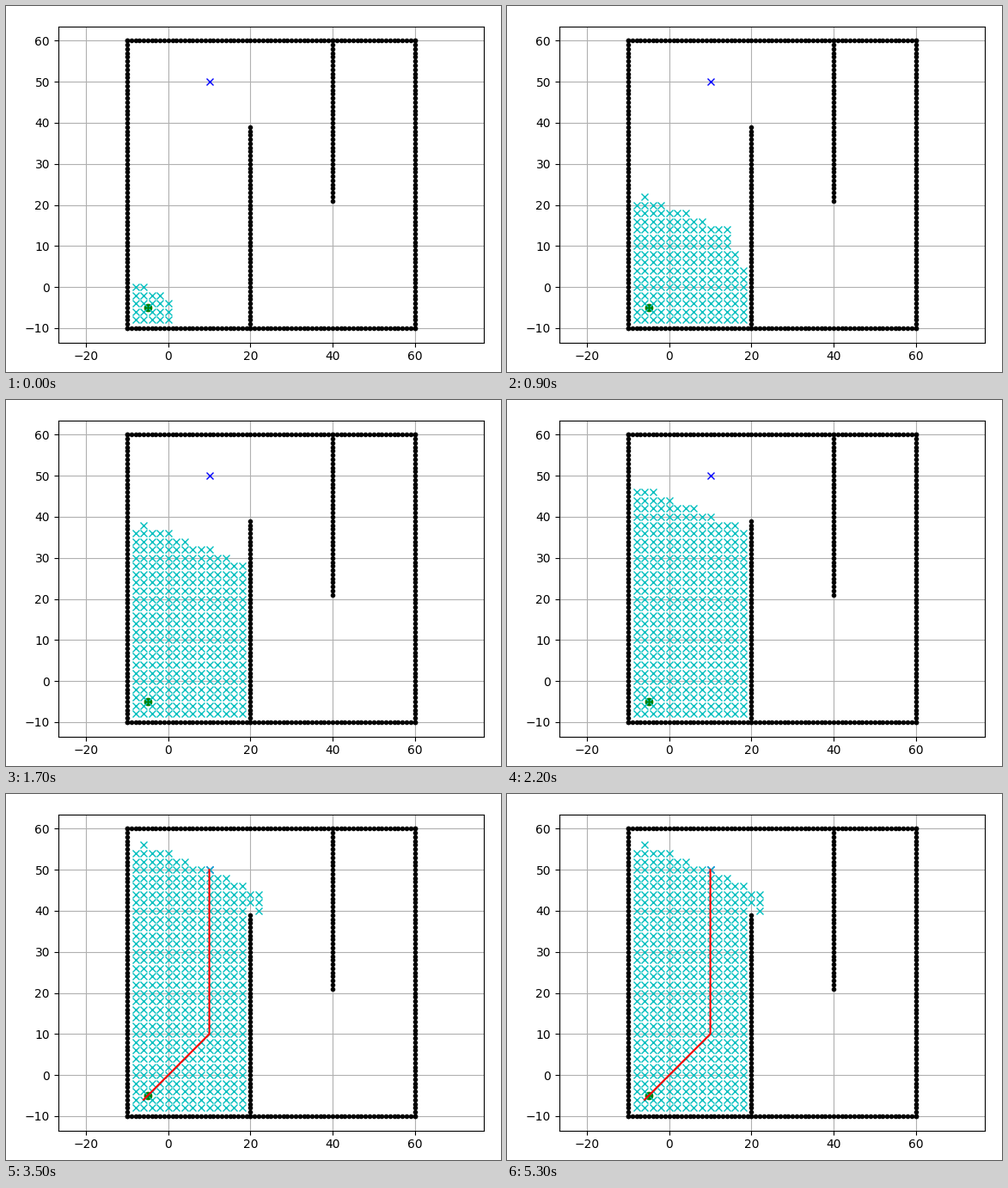
Write a matplotlib script that moves like this. It is 576 px wide and 426 px high and loops after 5400 ms.

```python
import math

import matplotlib.pyplot as plt
import numpy as np
from matplotlib.animation import FuncAnimation

W, H, DPI = 576, 426, 100
FRAMES, INTERVAL = 54, 100
SCALE = 4.78               # pixels per data unit
CENTER = (308.3, 207.65)   # pixel position of data point (25, 25)
AX_W, AX_H = 495.2, 77 * SCALE

CELL, ORIGIN, RADIUS = 2, -10, 1.0
START, GOAL = (-5, -5), (10, 50)

# Search progress, in batches of ten visited nodes, over the frames.
KEY_FRAMES = [0, 5, 12, 13, 18, 22, 24, 28]
KEY_BATCHES = [2, 11, 23, 24, 31, 36, 39, 44]


def build_walls():
    side = np.arange(-10, 61)
    low, high = np.full(71, -10), np.full(71, 60)
    left_wall, right_wall = np.arange(-10, 40), np.arange(21, 61)
    x = np.concatenate([side, high, side, low,
                        np.full(50, 20), np.full(40, 40)])
    y = np.concatenate([low, side, high, side, left_wall, right_wall])
    return x, y


def to_cell(point):
    return tuple(round((v - ORIGIN) / CELL) for v in point)


def to_world(cell):
    return tuple(v * CELL + ORIGIN for v in cell)


def dijkstra_order(wall_x, wall_y):
    """Return the visited positions in the order they are expanded."""
    diag = math.sqrt(2)
    moves = [(1, 0, 1), (0, 1, 1), (-1, 0, 1), (0, -1, 1),
             (-1, -1, diag), (-1, 1, diag), (1, -1, diag), (1, 1, diag)]

    def is_free(cell):
        x, y = to_world(cell)
        inside = -10 <= x < 60 and -10 <= y < 60
        return inside and np.hypot(wall_x - x, wall_y - y).min() > RADIUS

    goal = to_cell(GOAL)
    frontier, closed, order = {to_cell(START): 0.0}, set(), []
    while frontier:
        cell = min(frontier, key=frontier.get)
        cost = frontier.pop(cell)
        order.append(to_world(cell))
        if cell == goal:
            break
        closed.add(cell)
        for dx, dy, step in moves:
            near = (cell[0] + dx, cell[1] + dy)
            if near in closed or not is_free(near):
                continue
            frontier[near] = min(frontier.get(near, math.inf), cost + step)
    return np.array(order)


wall_x, wall_y = build_walls()
visited = dijkstra_order(wall_x, wall_y)

fig = plt.figure(figsize=(W / DPI, H / DPI), dpi=DPI, facecolor="white")
ax = fig.add_axes([(CENTER[0] - AX_W / 2) / W,
                   1 - (CENTER[1] + AX_H / 2) / H,
                   AX_W / W, AX_H / H])
ax.plot(wall_x, wall_y, ".k")
ax.plot(*START, "og")
ax.plot(*GOAL, "xb")
ax.grid(True)
crosses, = ax.plot([], [], "xc")
path, = ax.plot([-6, 10, 10], [-6, 10, 50], "-r")
ax.set_xlim(25 - AX_W / SCALE / 2, 25 + AX_W / SCALE / 2)
ax.set_ylim(25 - AX_H / SCALE / 2, 25 + AX_H / SCALE / 2)
ax.set_xticks(range(-20, 61, 20))
ax.set_yticks(range(-10, 61, 10))


def update(frame):
    batch = round(float(np.interp(frame, KEY_FRAMES, KEY_BATCHES)))
    seen = visited[:10 * batch + 1]
    crosses.set_data(seen[:, 0], seen[:, 1])
    path.set_visible(batch == KEY_BATCHES[-1])
    return crosses, path


anim = FuncAnimation(fig, update, frames=FRAMES, interval=INTERVAL,
                     repeat=True, repeat_delay=0)
plt.show()
```
